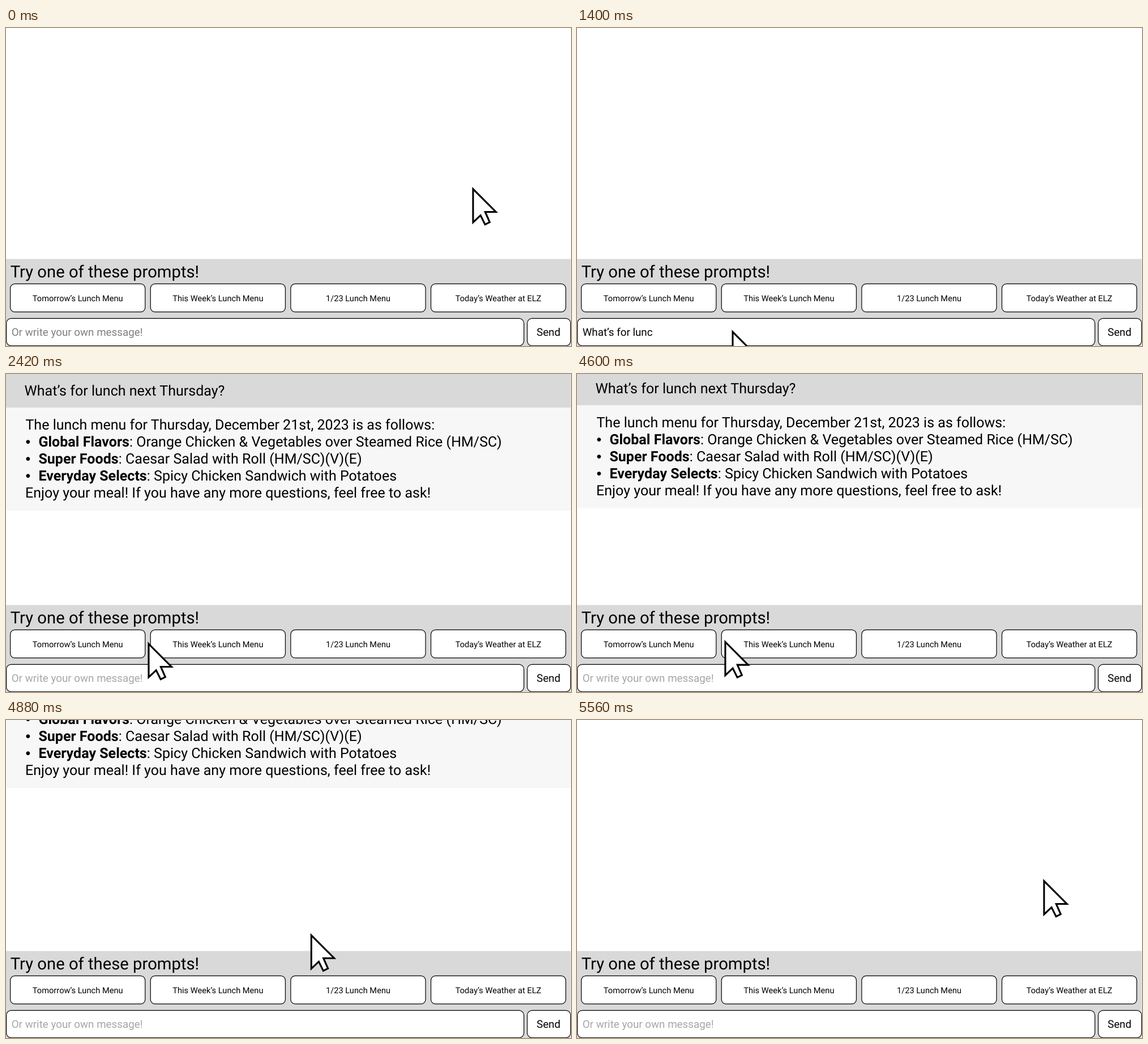
Recreate the animation shown at these times as an HTML page. Size 998 by 561 pixels, loop 5.69 s.

```html
<!DOCTYPE html>
<html lang="en">
<head>
<meta charset="utf-8">
<title>Lunch menu chat</title>
<style>
  html, body { margin: 0; width: 100%; height: 100%; overflow: hidden; background: #fff; }
  svg { display: block; width: 100%; height: 100%; }
  text { font-family: Roboto, Arial, sans-serif; font-size: 25.05px; text-rendering: geometricPrecision; }
  .bold { font-weight: 700; }
  .bullet { font-family: "Liberation Sans", Arial, sans-serif; }
  .title { font-size: 29.25px; }
  .field { font-size: 18.8px; }
  .label { font-size: 14.65px; }
  .mid { text-anchor: middle; }
  .box { fill: #fff; stroke: #000; stroke-width: 1.2; }
</style>
</head>
<body>
<svg viewBox="0 0 998 561" preserveAspectRatio="none">
  <g id="chat">
    <g id="question">
      <rect width="997.5" height="59.5" fill="#d9d9d9"/>
      <text x="32.6" y="38.4">What’s for lunch next Thursday?</text>
    </g>
    <g id="answer">
      <rect x="1" y="59.5" width="997" height="181.5" fill="#f7f7f7"/>
      <text x="34.4" y="98.3">The lunch menu for Thursday, December 21st, 2023 is as follows:</text>
      <text class="bullet" x="34.6" y="128.2">•</text>
      <text x="57.4" y="128.2"><tspan class="bold">Global Flavors</tspan>: Orange Chicken &amp; Vegetables over Steamed Rice (HM/SC)</text>
      <text class="bullet" x="34.6" y="158.2">•</text>
      <text x="57.4" y="158.2"><tspan class="bold">Super Foods</tspan>: Caesar Salad with Roll (HM/SC)(V)(E)</text>
      <text class="bullet" x="34.6" y="188.1">•</text>
      <text x="57.4" y="188.1"><tspan class="bold">Everyday Selects</tspan>: Spicy Chicken Sandwich with Potatoes</text>
      <text x="34" y="218.1">Enjoy your meal! If you have any more questions, feel free to ask!</text>
    </g>
  </g>

  <rect y="407.5" width="997.5" height="153.5" fill="#d9d9d9"/>
  <text class="title" x="7.7" y="439.9">Try one of these prompts!</text>
  <g id="prompts"></g>
  <rect class="box" x="0.6" y="512.4" width="914.2" height="48.2" rx="8.5"/>
  <text class="field" id="hint" x="9.7" y="542.9">Or write your own message!</text>
  <text class="field" id="typed" x="9.7" y="542.9"></text>
  <rect class="box" x="920.7" y="512.4" width="76.7" height="48.2" rx="8.5"/>
  <text class="field mid" x="958.3" y="542.9">Send</text>

  <path id="cursor" d="M0 0V58.8L13.2 46.4L21.2 62.5L29.4 58.5L21.4 40.4H40.4Z"
        fill="#fff" stroke="#000" stroke-width="3.1" stroke-miterlimit="6"/>
</svg>
<script>
const LOOP = 5690, TICK = 40;
const MESSAGE = "What’s for lunch next Thursday?";
const PROMPTS = ["Tomorrow’s Lunch Menu", "This Week’s Lunch Menu", "1/23 Lunch Menu", "Today’s Weather at ELZ"];
const HOME = [825, 284.1], FIELD = [275, 536.1], REST = [252, 476.1];
const SCROLL = 241;
const $ = id => document.getElementById(id);

$("prompts").innerHTML = PROMPTS.map((label, i) => {
  const x = 7.6 + i * 247.65;
  return `<rect class="box" x="${x}" y="451.3" width="238.2" height="49.6" rx="8"/>
    <text class="label mid" x="${x + 119.1}" y="481.7">${label}</text>`;
}).join("");

const mix = (a, b, p) => a + (b - a) * p;

// Progress of a move, advancing in whole ticks
function phase(t, start, length) {
  const done = Math.floor((t - start) / TICK) * TICK;
  return Math.min(1, Math.max(0, done / length));
}

// Cubic bezier easing (.24, .05, .305, 1)
function ease(x) {
  const curve = (a, b, s) => 3 * a * s * (1 - s) ** 2 + 3 * b * s * s * (1 - s) + s ** 3;
  let lo = 0, hi = 1;
  for (let i = 0; i < 30; i++) {
    const m = (lo + hi) / 2;
    if (curve(0.24, 0.305, m) < x) lo = m; else hi = m;
  }
  return x >= 1 ? 1 : x <= 0 ? 0 : curve(0.05, 1, lo);
}

// Letters arrive in bursts every 80 ms
function letters(t) {
  const burst = Math.floor((t - 1000) / 80) * 80;
  return Math.min(MESSAGE.length, Math.max(0, Math.floor(burst / 25.6)));
}

function draw(t) {
  const reach = phase(t, 550, 400);
  const send = phase(t, 1890, 200);
  const reply = phase(t, 2220, 200);
  const leave = ease(phase(t, 4560, 1000));

  let from = HOME, to = FIELD, p = ease(reach);
  if (leave > 0) [from, to, p] = [REST, HOME, leave];
  else if (reply > 0) [from, to, p] = [FIELD, REST, ease(reply)];
  $("cursor").setAttribute("transform", `translate(${mix(from[0], to[0], p)} ${mix(from[1], to[1], p)})`);

  $("chat").setAttribute("transform", `translate(0 ${-SCROLL * leave})`);
  $("question").setAttribute("opacity", send);
  $("answer").setAttribute("opacity", reply);

  $("hint").setAttribute("fill", send > 0 ? "#a6a6a6" : "#7f7f7f");
  $("hint").setAttribute("opacity", send > 0 ? send : 1 - reach);
  $("typed").textContent = MESSAGE.slice(0, letters(t));
  $("typed").setAttribute("opacity", 1 - send);
}

function frame() {
  draw(performance.now() % LOOP);
  requestAnimationFrame(frame);
}
frame();
</script>
</body>
</html>
```
